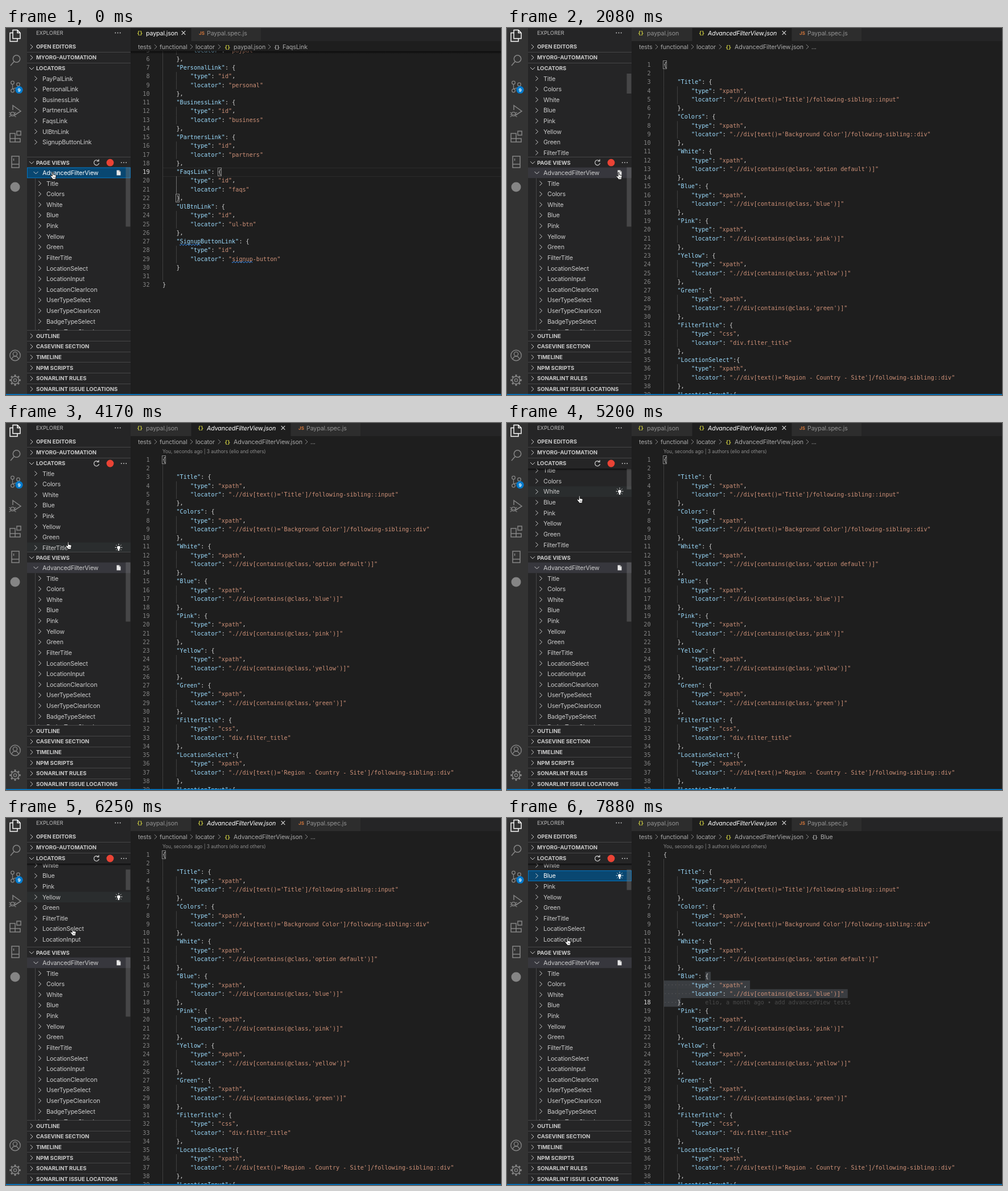
Write an HTML page with a canvas that moves like this. It is 870 px wide and 644 px high and loops after 8000 ms.

```html
<!DOCTYPE html>
<html lang="en">
<head>
<meta charset="utf-8">
<title>Locator explorer</title>
<style>
html, body { margin: 0; width: 100%; height: 100%; overflow: hidden; background: #1e1e1e }
canvas { display: block }
</style>
</head>
<body>
<canvas id="stage" width="870" height="644"></canvas>
<script>
const c = document.getElementById('stage').getContext('2d');
const LOOP = 8000, STEP = 148.6, ROW = 18.62, LINE = 15.24, CH = 6.11, CODE_X = 275;
const UI = 'Inter, "Open Sans", sans-serif';
const MONO = '10.15px "DejaVu Sans Mono", "Liberation Mono", monospace';
const TEXT = '#cccccc', GREY = '#858585';

// ---- content ----
const links = [['PayPalLink', 'paypal'], ['PersonalLink', 'personal'], ['BusinessLink', 'business'],
  ['PartnersLink', 'partners'], ['FaqsLink', 'faqs'], ['UlBtnLink', 'ul-btn'], ['SignupButtonLink', 'signup-button']];
const byClass = v => `.//div[contains(@class,'${v}')]`;
const byLabel = (v, tag) => `.//div[text()='${v}']/following-sibling::${tag}`;
const fields = [['Title', byLabel('Title', 'input')], ['Colors', byLabel('Background Color', 'div')],
  ['White', byClass('option default')], ['Blue', byClass('blue')], ['Pink', byClass('pink')],
  ['Yellow', byClass('yellow')], ['Green', byClass('green')], ['FilterTitle', 'div.filter_title'],
  ['LocationSelect', byLabel('Region - Country - Site', 'div')], ['LocationInput', byClass('input')]];
const linkNames = links.map(l => l[0]);
const fieldNames = [...fields.map(f => f[0]), 'LocationClearIcon', 'UserTypeSelect', 'UserTypeClearIcon',
  'BadgeTypeSelect', 'BadgeTypeClearIcon'];

const block = (name, type, value, end = '},') => [
  `    "${name}":${name.startsWith('Location') ? '' : ' '}{`,
  `        "type": "${type}",`, `        "locator": "${value}"`, '    ' + end];
const linkDoc = ['{', '', ...links.flatMap(([n, v], i) => block(n, 'id', v, i == 6 ? '}' : '},')), '', '}'];
const viewDoc = ['{', '', ...fields.flatMap(([n, v]) => block(n, v.startsWith('div') ? 'css' : 'xpath', v))];

// ---- motion: [step, values...] ----
const pointerKeys = [[0, 83, 259], [3, 57, 260], [5, 70, 260], [7, 186, 262], [10, 197, 260], [17, 197, 259],
  [18, 180, 262], [22, 60, 266], [23, 60, 266], [24, 58, 264], [25, 58, 264], [26, 75, 245], [27, 95, 224],
  [28, 110, 215], [31, 130, 160], [33, 128, 134], [40, 128, 134], [41, 124, 150], [43, 112, 250],
  [44, 108, 256], [46, 101, 122], [47, 100, 108], [48, 98, 104], [51, 98, 106], [53, 107, 217]];
const scrollKeys = [[0, 0], [33, 0], [36, 8], [39, 14.7], [40, 30], [41, 43], [54, 43]];

function sample(keys, k) {
  const i = keys.findIndex(p => p[0] >= k);
  if (i < 1) return keys[i < 0 ? keys.length - 1 : 0].slice(1);
  const a = keys[i - 1], b = keys[i], f = (k - a[0]) / (b[0] - a[0]);
  return a.slice(1).map((v, j) => v + (b[j + 1] - v) * f);
}

// ---- drawing helpers ----
function rect(x, y, w, h, color) { c.fillStyle = color; c.fillRect(x, y, w, h); }

function frame(x, y, w, h, color, width = 1) {
  c.strokeStyle = color; c.lineWidth = width; c.strokeRect(x, y, w, h);
}

function text(s, x, y, color = TEXT, font = '10.7px ' + UI, spacing = -.15) {
  c.font = font; c.letterSpacing = spacing + 'px'; c.fillStyle = color;
  c.fillText(s, x, y);
}

function line(points, color, width = 1) {
  c.beginPath();
  points.forEach(p => c.lineTo(...p));
  c.strokeStyle = color; c.lineWidth = width; c.stroke();
}

function path(d, x, y, stroke, width = 1.3, fill) {
  const p = new Path2D(d);
  c.save();
  c.translate(x, y);
  if (fill) { c.fillStyle = fill; c.fill(p); }
  if (stroke) { c.strokeStyle = stroke; c.lineWidth = width; c.stroke(p); }
  c.restore();
}

function disc(x, y, r, color) {
  c.beginPath(); c.arc(x, y, r, 0, 7); c.fillStyle = color; c.fill();
}

function ring(x, y, r, color, width = 1.3) {
  c.beginPath(); c.arc(x, y, r, 0, 7); c.strokeStyle = color; c.lineWidth = width; c.stroke();
}

function clipped(x, y, w, h, draw) {
  c.save();
  c.beginPath(); c.rect(x, y, w, h); c.clip();
  draw();
  c.restore();
}

function shadow(x, y, w, h) {
  const g = c.createLinearGradient(0, y, 0, y + h);
  g.addColorStop(0, 'rgba(0,0,0,.65)'); g.addColorStop(1, 'rgba(0,0,0,0)');
  rect(x, y, w, h, g);
}

function chevron(x, y, open, color = TEXT) {
  path(open ? 'M-4-2L0 2L4-2' : 'M-2.2-4L2-0L-2.2 4', x, y, color, 1);
}

function dots(x, y) { [-4.2, 0, 4.2].forEach(d => disc(x + d, y, .9, TEXT)); }
function braces(x, y, color = '#cbcb41') { text('{}', x, y + 3.5, color, 'bold 9.4px "DejaVu Sans Mono", monospace', -.8); }
function cross(x, y) { path('M-3.3-3.3L3.3 3.3M3.3-3.3L-3.3 3.3', x, y, '#ddd', 1.1); }

// ---- parts ----
function activityBar() {
  rect(0, 0, 37, 644, '#333333');
  path('M-4-10H4L9-5V5H-4ZM4-10V-5H9M-4-5H-9V10H4V5', 16, 13.5, '#fff', 1.4);
  ring(18.5, 54, 6.2, GREY, 1.5);
  path('M-3 3L-9 10', 17, 56, GREY, 1.6);
  ring(11.5, 96, 2.8, GREY); ring(21.5, 99, 2.8, GREY); ring(11.5, 110, 2.8, GREY);
  path('M-4.5-4V4M5.5-1C5 3-2 2-4.5 4', 16, 103, GREY);
  disc(23, 108.5, 6.6, '#007acc');
  text('9', 20.6, 111.5, '#fff', 'bold 8px ' + UI, 0);
  path('M-4-2V-10L10 0L-1 7', 16, 146, GREY, 1.5);
  ring(11.5, 151, 3.4, GREY);
  path('M-6-3L-3-1M6-3L3-1M-6 1H6M-6 5L-3 3M6 5L3 3', 11.5, 151, GREY, 1.1);
  path('M-9-5H0V4H9V10H-9ZM-9 4H0V10M3-9H10V-2H3Z', 16, 190, GREY, 1.5);
  path('M-6.5-10H6.5V10H-6.5ZM-6.5 4H6.5M-3-6V-2', 16.5, 235, GREY, 1.5);
  disc(16, 279, 8.5, GREY);
  ring(16, 574.5, 9.2, GREY, 1.4); ring(16, 572, 3.6, GREY, 1.4);
  path('M-6 6.5C-4 0 4 0 6 6.5', 16, 574.5, GREY, 1.4);
  ring(16, 618, 6.6, GREY, 1.5); ring(16, 618, 2.6, GREY, 1.4);
  for (let i = 0; i < 8; i++) {
    const a = i * Math.PI / 4, u = Math.cos(a), v = Math.sin(a);
    line([[16 + u * 7, 618 + v * 7], [16 + u * 9.8, 618 + v * 9.8]], GREY, 3);
  }
}

function section(name, y, open, border = true) {
  if (border) rect(37, Math.round(y - 10), 182, 1, '#464647');
  chevron(45, y, open);
  text(name, 53, y + 3.3, TEXT, 'bold 9.5px ' + UI, 0);
}

function sectionActions(y) {
  path('M3.4-3A4.5 4.5 0 1 0 4.5 1M4-6V-2.6H.6', 159, y, TEXT, 1.2);
  disc(183, y, 6.4, '#ea4335');
  dots(207, y);
}

function bulb(x, y) {
  disc(x, y - .5, 2.8, '#fff');
  rect(x - 1.3, y + 2, 2.6, 3.2, '#fff');
  path('M-6.3-.5H-4.3M4.3-.5H6.3M-4.5-5L-3.3-3.8M4.5-5L3.3-3.8M0-7V-5M-4.5 4L-3.3 2.8M4.5 4L3.3 2.8', x, y, '#fff', 1);
}

function selectedRow(y) {
  rect(37, y - 9.3, 182, 18.6, '#094771');
  frame(37.4, y - 8.9, 181.2, 17.8, '#007fd4', .85);
}

function locatorList(k, hotY) {
  const names = k < 13 ? linkNames : fieldNames, [scroll] = sample(scrollKeys, k);
  clipped(37, 80, 182, 146, () => {
    names.forEach((name, i) => {
      const y = 88.6 + i * ROW - scroll;
      const hover = k < 49 && hotY < 226 && Math.abs(hotY - y) <= ROW / 2;
      const picked = k >= 49 && name == 'Blue';
      if (picked) selectedRow(y);
      else if (hover) rect(37, y - ROW / 2, 182, ROW, '#2a2d2e');
      chevron(52.5, y, false);
      text(name, 64, y + 3.9, picked ? '#fff' : TEXT);
      if (hover || picked) bulb(198, y);
    });
    if (scroll) shadow(37, 80, 182, 4);
    if (k >= 13 && k < 18 || k >= 29) rect(210.5, 79 + scroll * .265, 8, 36, 'rgba(121,121,121,.4)');
  });
}

function viewTree(k) {
  if (k < 13) selectedRow(254);
  else rect(37, 244.7, 182, 18.6, '#37373d');
  chevron(52.5, 254, true);
  text('AdvancedFilterView', 64, 257.9, k < 13 ? '#fff' : TEXT);
  path('M-3.5-4.5H1L3.5-2V4.5H-3.5Z', 198, 254, null, 0, '#e8e8e8');
  path('M1-4.5V-2H3.5', 198, 254, '#777', .8);
  clipped(37, 263.5, 182, 267, () => {
    rect(51, 263, 1, 268, '#454546');
    fieldNames.forEach((name, i) => {
      const y = 272.7 + i * ROW;
      chevron(59.5, y, false);
      text(name, 71, y + 3.9);
    });
  });
  if (k < 48) rect(210.5, 244.5, 8, 104, 'rgba(121,121,121,.4)');
}

function sidebar(k, hotY) {
  rect(37, 0, 182, 644, '#252526');
  text('EXPLORER', 53, 12, '#bbbbbb', '9.3px ' + UI, 0);
  dots(196.5, 8.5);
  section('OPEN EDITORS', 33, false, false);
  section('MYORG-AUTOMATION', 51.8, false);
  section('LOCATORS', 71, true);
  locatorList(k, hotY);
  section('PAGE VIEWS', 236.2, true);
  sectionActions(k >= 26 && hotY < 227 ? 71 : 236.2);
  viewTree(k);
  ['OUTLINE', 'CASEVINE SECTION', 'TIMELINE', 'NPM SCRIPTS', 'SONARLINT RULES', 'SONARLINT ISSUE LOCATIONS']
    .forEach((name, i) => section(name, 540.4 + i * ROW, false));
}

function tab(x, w, name, active, style = '') {
  rect(x, 0, w, 23, active ? '#1e1e1e' : '#2d2d2d');
  rect(x + w - 1, 0, 1, 23, '#252526');
  if (name.endsWith('.js')) text('JS', x + 13, 11.8, '#d2763a', 'bold 8px ' + UI, 0);
  else braces(x + 11, 8.5);
  text(name, x + 27, 12.7, active ? '#fff' : '#929292', style + ' 10.7px ' + UI);
  if (active) cross(x + w - 14, 8.5);
}

function crumbs(file, end, symbol) {
  const color = '#a9a9a9', sep = x => chevron(x, 33, false, '#8a8a8a');
  [['tests', 232], ['functional', 270], ['locator', 333], [file, 400]].forEach(([s, x]) => text(s, x, 36.8, color));
  [263, 326, 375, end].forEach(sep);
  braces(384, 33);
  if (!symbol) return text('...', end + 7, 36.8, color);
  braces(end + 8, 33, color);
  text(symbol, end + 23, 36.8, color);
}

function codeLine(s, y) {
  let x = CODE_X;
  s.split(/("[^"]*")/).forEach((part, i, all) => {
    const color = i % 2 == 0 ? '#d4d4d4' : all[i + 1].startsWith(':') ? '#9cdcfe' : '#ce9178';
    text(part, x, y + 3.7, color, MONO, 0);
    x += part.length * CH;
  });
}

function code(doc, first, active) {
  doc.forEach((s, i) => {
    const n = i + 1, y = first + i * LINE, inner = s.startsWith('        ');
    if (y < 30) return;
    if (i && s != '}') rect(CODE_X, y - LINE / 2, 1, LINE + .3, '#404040');
    if (inner) rect(299, y - LINE / 2, 1, LINE + .3, active == 19 && n > 19 && n < 22 ? '#707070' : '#404040');
    codeLine(s, y);
    c.textAlign = 'right';
    text(n, 252.5, y + 3.7, n == active ? '#e0e0e0' : GREY, MONO, 0);
    c.textAlign = 'left';
  });
}

function bracket(col, y) { frame(Math.round(CODE_X + col * CH) - .5, Math.round(y - 7) + .5, 6, 14, '#888'); }

function squiggle(x, y, w) {
  const pts = [];
  for (let i = 0; i <= w; i++) pts.push([x + i, y + 1.2 * Math.sin(i * 1.25)]);
  line(pts, '#3794ff');
}

function linkEditor() {
  const y = n => 54.3 + (n - 6) * LINE;
  frame(275.5, 245.5, 600, 15, '#2b2b2b');
  clipped(219, 40.5, 651, 602, () => {
    code(linkDoc, y(1), 19);
    shadow(219, 40.5, 651, 5);
  });
  bracket(16, y(19)); bracket(4, y(22));
  squiggle(305, y(27) + 6, 37); squiggle(397, y(29) + 6, 36);
}

function viewEditor(k) {
  const y = n => 64.2 + (n - 1) * LINE, picked = k >= 50;
  if (picked) {
    const mark = (n, from, to) => rect(CODE_X + from * CH, y(n) - LINE / 2, (to - from) * CH, LINE + .3, '#3a3d41');
    mark(15, 12, 13.6); mark(16, 0, 24.9); mark(17, 0, 53); mark(18, 0, 5);
  }
  code(viewDoc, y(1), picked ? 18 : 0);
  if (picked) {
    [16, 17, 18].forEach(n => {
      for (let i = 0; i < (n < 18 ? 8 : 4); i++) disc(CODE_X + (i + .5) * CH, y(n), .6, '#6a6a6a');
    });
  } else bracket(0, y(1));
  if (k >= 51) text('elio, a month ago • add advancedView tests', CODE_X + 12 * CH, y(18) + 3.7, '#4a4a4a', MONO, 0);
  if (k >= 16) text('You, seconds ago | 3 authors (elio and others)', CODE_X, 53, '#8c8c8c', '8.5px ' + UI, -.08);
}

function editor(k) {
  rect(219, 0, 651, 644, '#1e1e1e');
  rect(219, 0, 651, 23, '#252526');
  tab(219, 107, 'paypal.json', k < 13);
  if (k < 13) {
    tab(326, 123, 'Paypal.spec.js');
    crumbs('paypal.json', 463, 'FaqsLink');
    linkEditor();
  } else {
    tab(326, 175, 'AdvancedFilterView.json', true, 'italic');
    tab(501, 123, 'Paypal.spec.js');
    crumbs('AdvancedFilterView.json', 528, k >= 50 && 'Blue');
    viewEditor(k);
  }
}

function hand(x, y) {
  path('M-1.8 1V-5.2C-1.8-6.6.2-6.6.2-5.2V-1.8L3.6-1C4.8-.7 5.2 0 5 1.2L4.2 4.4V6.4H-1.6V5L-4.8 1.2C-5.2.2-4 -.6-3 .2Z',
    x, y, '#111', 1, '#fff');
  path('M.6 2V4.4M2.4 2V4.4', x, y, '#333', .7);
}

function draw(now) {
  const k = Math.floor(now % LOOP / STEP + .06);
  const [x, y] = sample(pointerKeys, k);
  // Hover styling trails the pointer by one step.
  const hotY = sample(pointerKeys, Math.max(0, k - 1))[1] - 5;
  c.textAlign = 'left';
  editor(k);
  sidebar(k, hotY);
  activityBar();
  rect(0, 642.4, 870, 1.6, '#007acc');
  hand(x, y);
}

const start = performance.now();
(function tick() {
  draw(performance.now() - start);
  requestAnimationFrame(tick);
})();
</script>
</body>
</html>
```
